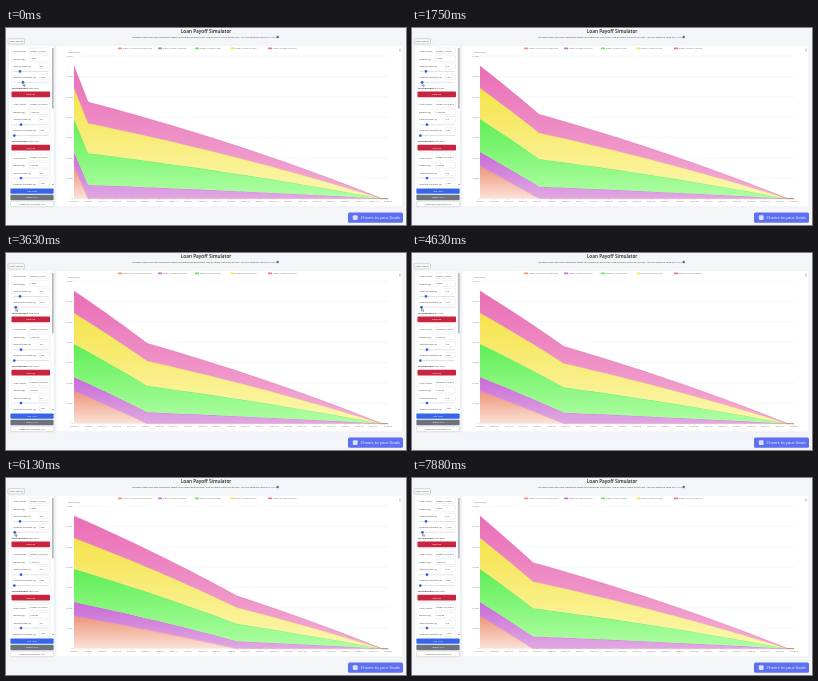
An HTML page that plays this animation: 400 px wide and 197 px high, repeating every 8000 ms.

```html
<!DOCTYPE html>
<html lang="en">
<head>
<meta charset="utf-8">
<title>Loan Payoff Simulator</title>
<style>
html, body { margin: 0; width: 100%; height: 100%; overflow: hidden; background: #f3f5f9; }
svg { display: block; width: 100vw; height: 100vh; }
text { font-family: "Open Sans", "Noto Sans", sans-serif; fill: #333; }
</style>
</head>
<body>
<svg id="stage" viewBox="0 0 400 197"></svg>
<script>
const LEFT = 68, RIGHT = 382, PAID = 375.5, BASE = 170.6;
const stage = document.getElementById('stage');

// Layers from the bottom up: height at the start, strong and pale colour.
const layers = [
  { h: 32.4, top: '#ee9478', low: '#fbe2d8', line: '#e58468' },
  { h: 14.2, top: '#c86bd6', low: '#e0a8e2', line: '#b95fc8' },
  { h: 33, top: '#5fee55', low: '#b0ffa5', line: '#52d548' },
  { h: 31, top: '#f5e34a', low: '#fcf7b2', line: '#ddca45' },
  { h: 22, top: '#ea6eb6', low: '#f2aed5', line: '#dc62a5' }
];

// Time in ms and the month in which the first loan is paid off.
const poses = [[0, 14], [1000, 55], [2500, 64], [4625, 84], [5500, 307], [7125, 93], [7875, 53], [8000, 52]];

const rect = (x, y, w, h, fill, r = 0, line = 'none') =>
  `<rect x="${x}" y="${y}" width="${w}" height="${h}" rx="${r}" fill="${fill}" stroke="${line}" stroke-width=".35"/>`;
const text = (x, y, size, str, attrs = '') =>
  `<text x="${x}" y="${y}" font-size="${size}" ${attrs}>${str}</text>`;
const mid = 'text-anchor="middle" ';
const white = 'style="fill:#fff" ';
const muted = 'style="fill:#666" ';

function field(x, y, value, id = '') {
  return rect(x, y - 3.8, 43.5 - x, 5.6, '#fff', .8, '#d3d8df') +
    text(x + .9, y - .2, 2.2, value, id && `id="${id}"`);
}

function slider(y, x, id = '') {
  return rect(7, y - .5, 36, 1, '#dfe3ea', .5) +
    `<circle ${id && `id="${id}"`} cx="${x}" cy="${y}" r="1.35" fill="#2f60e8"/>`;
}

function loan(y, name, balance, rate, rateX, pay, first) {
  const id = s => first ? s : '';
  const label = (dy, str) => text(7.3, y + dy, 2.35, str);
  return rect(5.2, y - 6, 40, 53, '#fff', 1, '#e4e7ee') +
    label(0, 'Loan Name:') + field(23.3, y, name) +
    label(7.7, 'Balance ($)') + field(23.3, y + 7.7, balance) +
    label(15.2, 'Interest Rate (%)') + field(33, y + 15.2, rate) +
    slider(y + 19.6, rateX) +
    label(26, 'Monthly Payment ($)') + field(33.5, y + 26, pay, id('pay')) +
    slider(y + 30.5, 8.3, id('thumb')) +
    text(5.8, y + 37.3, 2.35, `<tspan font-weight="700">Last Payment:</tspan> <tspan ${first ? 'id="last"' : ''}>Sep 2032</tspan>`) +
    rect(5.5, y + 39.6, 38.5, 5.8, '#c9243f', .8) +
    text(24.7, y + 43.4, 2.4, 'Remove', mid + white);
}

function button(y, fill, label, color, line) {
  return rect(4.4, y, 43.2, 5.4, fill, .8, line) +
    text(26, y + 3.6, 2.3, label, mid + `style="fill:${color}"`);
}

function monthName(n, numeric) {
  const d = new Date(2022, 6 + Math.round(n), 1);
  return numeric ? `${d.getFullYear()}-${String(d.getMonth() + 1).padStart(2, '0')}` :
    `${d.toLocaleString('en-US', { month: 'short' })} ${d.getFullYear()}`;
}

function chartFrame() {
  let s = '';
  for (let i = 0; i < 8; i++) {
    const y = BASE - i * 20.37;
    s += `<path d="M${LEFT} ${y}H${RIGHT}" stroke="#e6e8ef" stroke-width=".4"/>` +
      text(66.8, y + .8, 2.1, i ? `${i}0,000` : '0', 'text-anchor="end" ' + muted);
  }
  for (let i = 0; i < 23; i++) {
    const x = LEFT + i * (RIGHT - LEFT) / 22;
    s += `<path d="M${x} ${BASE}v1" stroke="#888" stroke-width=".3"/>` +
      text(x, 174.3, 2.2, monthName(i * 14.27, true), mid + muted);
  }
  return s + text(68, 25.2, 2.2, 'Payment ($)', mid + muted) +
    '<path d="M394 20.4v2m-.8 -.8l.8 .8l.8 -.8m-1.8 1.5h2" fill="none" stroke="#777" stroke-width=".35"/>';
}

function legend() {
  const items = [
    [112, 'DIRECT UNSUB STAFFORD (sub)'], [152, 'DIRECT STUDENT (unsub)'],
    [189, 'DIRECT STUDENT (sub)'], [224.5, 'DIRECT STUDENT (sub)'], [262, 'DIRECT STUDENT (unsub)']
  ];
  return items.map(([x, label], i) =>
    rect(x, 19.6, 4, 1.6, layers[i].top, .5) +
    text(x + 4.7, 21.2, 2, label, muted)).join('');
}

const gradients = layers.map((l, i) =>
  `<linearGradient id="fill${i}" x2="0" y2="1"><stop stop-color="${l.top}"/><stop offset="1" stop-color="${l.low}"/></linearGradient>`).join('');

stage.innerHTML = `<defs>${gradients}<clipPath id="panel">${rect(2, 17, 44, 142, '#fff')}</clipPath></defs>` +
  rect(0, 0, 400, 197, '#f3f5f9') +
  text(200, 5.1, 4.75, 'Loan Payoff Simulator', mid + 'font-weight="600" style="fill:#222"') +
  text(126, 9.9, 2.41, 'Visualize how your loan payments affect your balances over time. Add as many loans as you like. You can view the code on <tspan style="fill:#3264e0">Forlud</tspan>') +
  '<circle cx="271.7" cy="9" r="1.2" fill="#666"/>' +
  rect(2, 10.7, 16.5, 5.2, '#fafbfd', .8, '#8b929e') + text(10.2, 14.1, 2.2, 'Hide Controls', mid) +
  rect(2.5, 17.3, 45.5, 162, '#fff', 1.2, '#dfe2e9') +
  `<g clip-path="url(#panel)">` +
  loan(23.8, 'DIRECT UNSUB', '14999', '5.5', 14, '4286', true) +
  loan(77.1, 'DIRECT STUDENT', '17000.46', '5.5', 15, '480') +
  loan(130.5, 'DIRECT STUDENT', '7226.89', '5.5', 15, '1601') + '</g>' +
  rect(46.4, 20, 1, 60.5, '#85888e', .5) +
  '<path d="M46.2 156h1.4l-.7 1.2z" fill="#555"/>' +
  button(160.4, '#3566e8', 'Add Loan', '#fff', 'none') +
  button(166.8, '#6c737d', 'Import CSV', '#fff', 'none') +
  button(173.2, '#fff', 'Download Template CSV', '#444', '#a0a6b0') +
  rect(50, 17.3, 346.5, 161.5, '#fff', 1.2, '#dfe2e9') +
  chartFrame() + legend() +
  layers.map((l, i) => `<path id="area${i}" fill="url(#fill${i})"/><path id="line${i}" fill="none" stroke="${l.line}" stroke-width=".45"/>`).join('') +
  `<path id="cursor" d="M0 0v3.2l.8-.6.6 1.3.6-.3-.6-1.2h1z" fill="#fff" stroke="#222" stroke-width=".35"/>` +
  rect(342, 184.5, 55, 10.3, '#5d70f2', 1.5) +
  rect(346.8, 187.2, 4.8, 4.8, '#d9ddff', 1) +
  text(354.6, 191.2, 4.05, 'Cheers to your Goals', white);

const $ = id => document.getElementById(id);

// Share of a loan still owed after n of all its months, with interest.
const RATE = .44 / (PAID - LEFT);
const owed = (n, all) => n >= all ? 0 : (1 - Math.exp(RATE * (n - all))) / (1 - Math.exp(-RATE * all));

// Payment moves evenly between poses; the payoff month follows from it.
function paymentAt(t) {
  const k = poses.findIndex(p => p[0] > t);
  const [t0, m0] = poses[k - 1], [t1, m1] = poses[k];
  const a = 60000 / m0, b = 60000 / m1;
  return a + (b - a) * (t - t0) / (t1 - t0);
}

function draw(now) {
  const t = Math.floor((now % 8000) / 125) * 125;
  const pay = paymentAt(t), months = 60000 / pay;
  const xs = [LEFT + months, PAID, RIGHT];
  for (let i = 0; i <= 30; i++) xs.push(LEFT + (PAID - LEFT) * i / 30);
  xs.sort((a, b) => a - b);

  let lower = xs.map(x => [x, BASE]);
  layers.forEach((l, i) => {
    const span = i ? PAID - LEFT : months;
    const upper = lower.map(([x, y]) => [x, y - l.h * owed(x - LEFT, span)]);
    const line = 'M' + upper.map(p => p.map(v => v.toFixed(2))).join('L');
    $('area' + i).setAttribute('d', line + 'L' + [...lower].reverse().join('L') + 'Z');
    $('line' + i).setAttribute('d', line);
    lower = upper;
  });

  const x = 8 + pay * .0021;
  $('thumb').setAttribute('cx', x);
  $('cursor').setAttribute('transform', `translate(${x} 54.8)`);
  $('pay').textContent = Math.round(pay);
  $('last').textContent = monthName(months);
}

let start;
function frame(now) {
  start ??= now;
  draw(now - start);
  requestAnimationFrame(frame);
}
draw(0);
requestAnimationFrame(frame);
</script>
</body>
</html>
```
